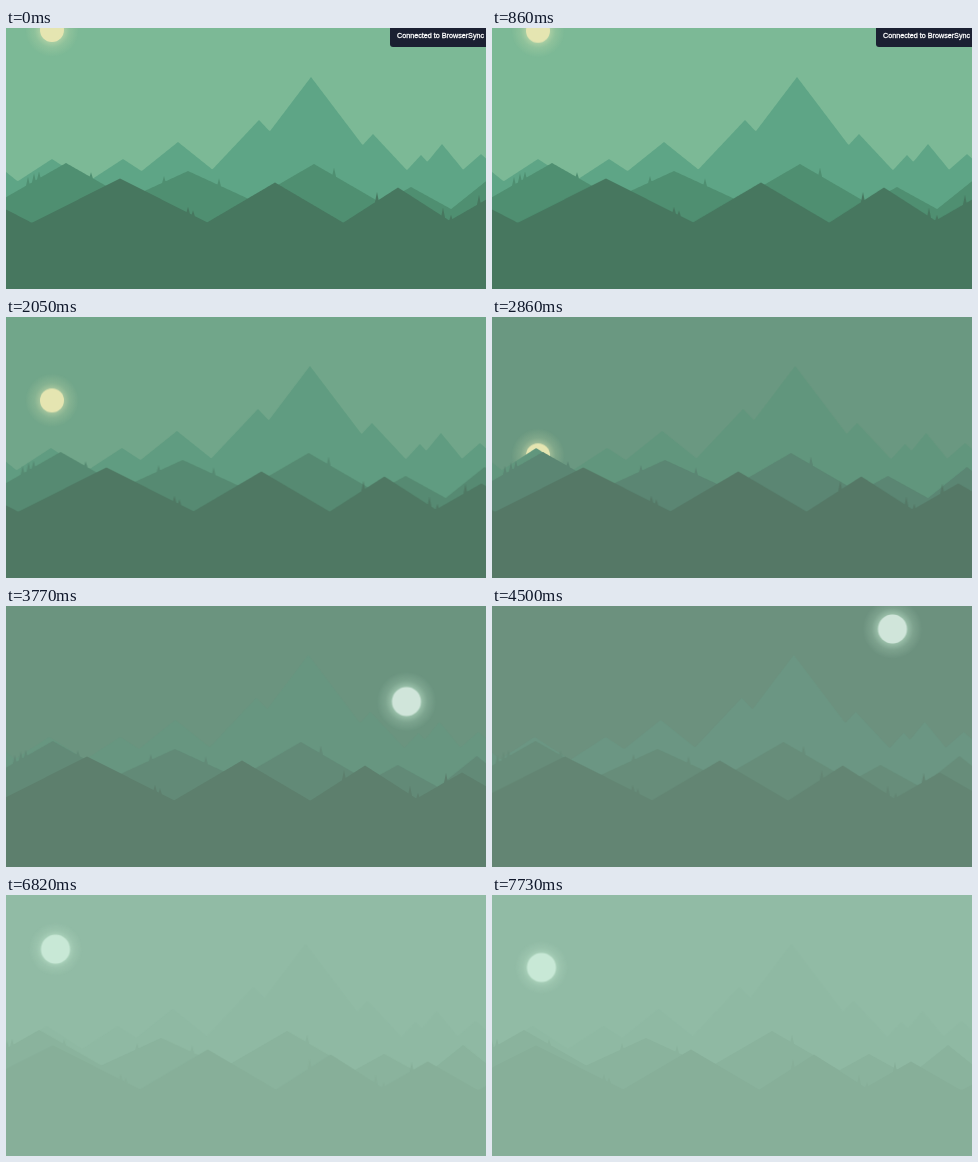
An HTML page that plays this animation: 480x261 px, repeating every 7780 ms.

```html
<!DOCTYPE html>
<html lang="en">
<head>
<meta charset="utf-8">
<title>Day and night hills</title>
<style>
  html, body { margin: 0; width: 100%; height: 100%; overflow: hidden; }
  svg { display: block; width: 100vw; height: 100vh; }
  text { font: 7.2px "Liberation Sans", Arial, sans-serif; fill: #fff; stroke: #fff; stroke-width: .3px; }
</style>
</head>
<body>
<svg viewBox="0 0 480 261">
  <defs>
    <radialGradient id="sunGlow">
      <stop offset=".4" stop-color="#e2e8b4" stop-opacity=".5"/>
      <stop offset=".65" stop-color="#d4e4b0" stop-opacity=".2"/>
      <stop offset="1" stop-color="#d4e4b0" stop-opacity="0"/>
    </radialGradient>
    <radialGradient id="moonGlow">
      <stop offset=".45" stop-color="#c8ecd4" stop-opacity=".55"/>
      <stop offset=".7" stop-color="#c0e4cc" stop-opacity=".2"/>
      <stop offset="1" stop-color="#c0e4cc" stop-opacity="0"/>
    </radialGradient>
  </defs>
  <rect id="sky" width="480" height="261"/>
  <g id="sun">
    <circle r="27" fill="url(#sunGlow)"/>
    <circle r="12" fill="#e5e5b1"/>
  </g>
  <g id="moon">
    <circle r="30" fill="url(#moonGlow)"/>
    <circle r="14.5" fill="#d0e5da"/>
  </g>
  <g id="paleMoon">
    <circle r="27" fill="url(#moonGlow)"/>
    <circle r="14.5" fill="#c8e8d6"/>
  </g>
  <path id="back"/>
  <path id="mid"/>
  <path id="front"/>
  <g id="badge">
    <path d="M384 0H480V19H387Q384 19 384 16Z" fill="#1b2032"/>
    <text x="391" y="10.2">Connected to BrowserSync</text>
  </g>
</svg>
<script>
const LOOP = 7780, BADGE_END = 1300;
const START = 850, BRAKE = 6650, SPEED = .0113, END = 70;
const $ = id => document.getElementById(id);

// Each hill is [peak x, peak y, slope]; a ridge is the outline of its hills.
function drawRidge(id, hills, floor, trees = []) {
  const height = x => Math.min(floor, ...hills.map(([px, py, slope]) => py + slope * Math.abs(x - px)));
  let d = 'M-10 270';
  for (let x = -10; x <= 560; x++) d += `L${x} ${height(x).toFixed(2)}`;
  d += 'V270Z';
  for (const x of trees) {
    const y = height(x);
    d += `M${x - 2.2} ${y + 2}L${x} ${y - 4 - x % 6}L${x + 2.2} ${y + 2}Z`;
  }
  $(id).setAttribute('d', d);
}

drawRidge('back', [[-20, 128, .8], [46, 131, .65], [117, 131, .65], [172, 114, .8], [253, 92, 1.06],
  [305, 49, 1.32], [367, 106, 1.07], [415, 127, 1.08], [436, 116, 1.22], [475, 126, .88]], 200);
drawRidge('mid', [[60, 135, .57], [182, 143, .46], [308, 136, .58], [405, 159, .55], [484, 150, .8]], 200,
  [22, 28, 33, 85, 158, 213, 328]);
drawRidge('front', [[-45, 158, .52], [114, 150.5, .503], [269, 154.5, .588], [392, 159.5, .643],
  [489, 166.5, .575], [590, 168, .54]], 194.5, [182, 187, 371, 437, 445, 473]);

// Steady scroll that brakes evenly to a stop at END.
function scrollAt(t) {
  if (t < BRAKE) return SPEED * Math.max(0, t - START);
  const left = END - SPEED * (BRAKE - START);
  const k = Math.min(1, (t - BRAKE) * SPEED / (2 * left));
  return END - left * (1 - k) ** 2;
}

// All motion runs along the scroll position instead of the clock.
const tracks = [];
function track(id, keyframes) {
  const anim = $(id).animate(keyframes, { duration: END, fill: 'both' });
  anim.pause();
  tracks.push(anim);
}
const slide = (id, x, y, dx, dy) => track(id, {
  transform: [`translate(${x}px, ${y}px)`, `translate(${x + dx * END}px, ${y + dy * END}px)`]
});

slide('back', 0, 0, -.08, 0);
slide('mid', 0, 0, -.4, 0);
slide('front', 0, 0, -1, 0);
slide('sun', 46, 2, 0, 6);
slide('moon', 400.5, 386, 0, -8.8);
slide('paleMoon', 49.5, 72.5 - 6.7 * END, 0, 6.7);

// Day, dusk, night, dawn
const offset = [0, 23, 41, 66, END].map(s => s / END);
const shade = (id, ...fill) => track(id, { fill: [...fill, fill[3]], offset });
shade('sky', '#7cb996', '#6a9881', '#6c917e', '#91bba5');
shade('back', '#5ea586', '#61967d', '#6b9683', '#8fb9a3');
shade('mid', '#4f8f71', '#5b8673', '#678d7a', '#8ab39d');
shade('front', '#47775f', '#557866', '#638573', '#87af99');

const origin = performance.now();
function render() {
  const t = (performance.now() - origin) % LOOP;
  const position = scrollAt(t);
  for (const anim of tracks) anim.currentTime = position;
  $('badge').style.visibility = t < BADGE_END ? 'visible' : 'hidden';
  requestAnimationFrame(render);
}
render();
</script>
</body>
</html>
```
